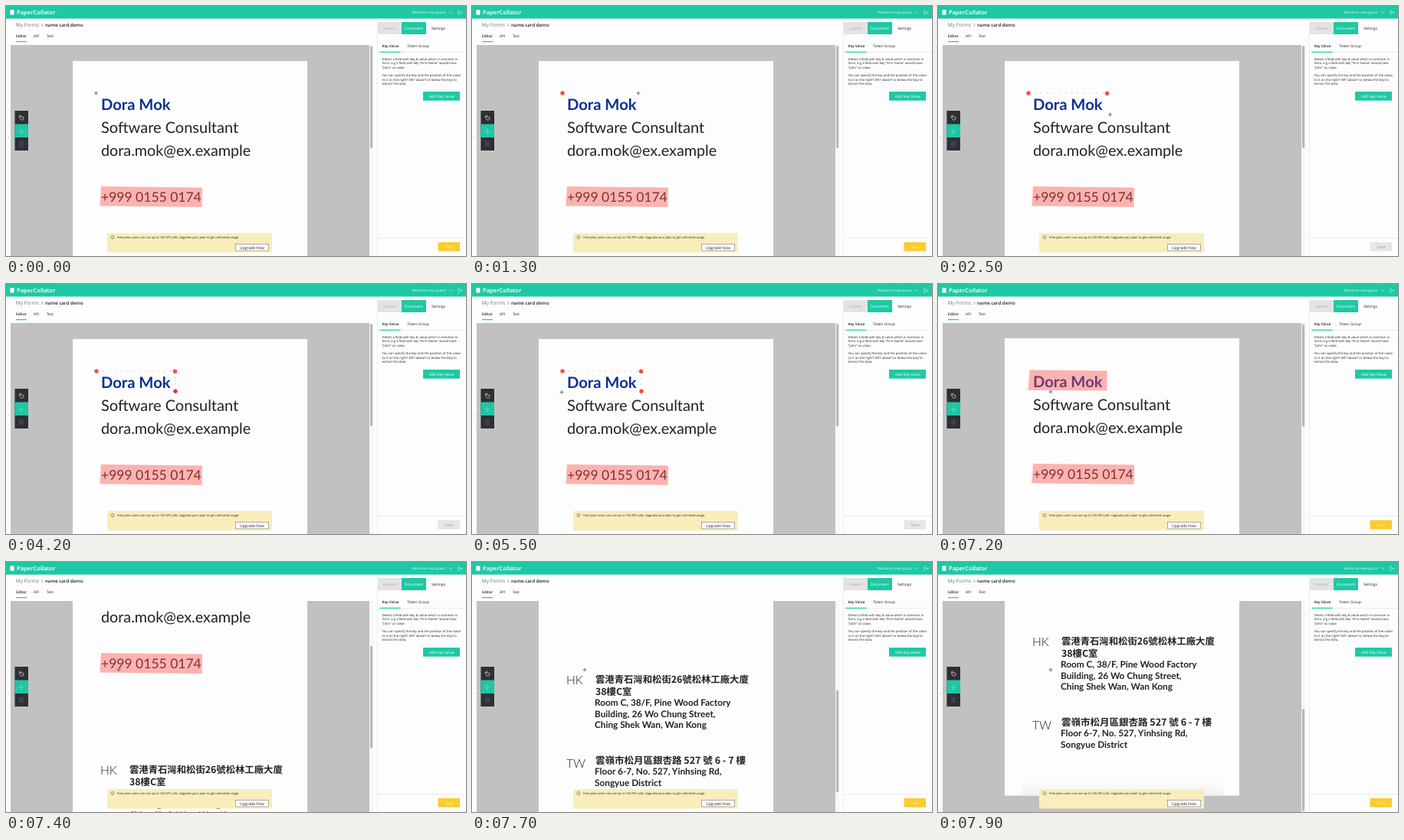
These frames come from a looping animation (600 by 327 pixels, 8 s). An HTML page:

```html
<!DOCTYPE html>
<html lang="en">
<head>
<meta charset="utf-8">
<style>
html, body { margin: 0; width: 100%; height: 100%; overflow: hidden; background: #fdfdfd; }
svg { display: block; font-family: "Open Sans", "Noto Sans", sans-serif; }
.card { font-family: Lato, sans-serif; fill: #222; }
.cjk { font-family: "Noto Sans CJK TC", "Noto Sans CJK", sans-serif; }
text { white-space: pre; text-rendering: geometricPrecision; }
</style>
</head>
<body>
<svg id="stage" width="600" height="327" viewBox="0 0 600 327">
  <clipPath id="view"><rect x="6" y="51" width="468" height="276"/></clipPath>
  <linearGradient id="shade" x2="0" y2="1">
    <stop stop-color="#fdfdfd"/><stop offset="1" stop-color="#f1f1f1"/>
  </linearGradient>

  <!-- document viewport -->
  <rect x="6" y="51" width="468" height="276" fill="#c1c1c1"/>
  <g clip-path="url(#view)">
    <g id="page">
      <rect x="87" y="72" width="306" height="518.500" fill="#fdfdfd"/>
      <rect x="110" y="572" width="262" height="18.500" fill="url(#shade)"/>
      <g id="cardText" class="card"></g>
      <g fill="#f94a47" fill-opacity=".42">
        <path d="M124 236L256 237.500L255.500 263L122.500 261.500Z"/>
        <path id="region" d="M119.500 113.500L220.500 114.500L220.500 140.500L117.500 140Z"/>
      </g>
    </g>
  </g>
  <g id="outline" fill="none" stroke="#f9a3a0" stroke-dasharray="1.500 6.500" stroke-dashoffset="-8">
    <path id="topEdge" d="M118 114H220"/>
    <path id="sideEdge" d="M220.500 114V140"/>
  </g>
  <g id="dots" fill="#f84b47">
    <circle cx="118" cy="114" r="2.700"/>
    <circle cx="220.500" cy="114.300" r="2.700"/>
    <circle cx="221" cy="140.300" r="2.700"/>
  </g>
  <path id="cursor" d="M-2.500 0H2.500M0 -2.500V2.500" stroke="#465360" stroke-width=".8"/>

  <!-- scrollbar and left rail -->
  <rect x="474" y="51" width="5.500" height="276" fill="#f8f8f8"/>
  <rect id="thumb" x="475" y="52" width="3.200" height="134" rx="1.600" fill="#b8b8b8"/>
  <path d="M3.500 170.500L2.300 172L3.500 173.500" fill="none" stroke="#aaa" stroke-width=".5"/>

  <!-- toolbar -->
  <rect x="11.500" y="137" width="17.500" height="52" fill="#2f2f33"/>
  <rect x="11.500" y="154.500" width="17.500" height="17.500" fill="#1fc6a3"/>
  <g fill="none" stroke="#ddd" stroke-width=".7">
    <path d="M17 144L19 148.500Q21 150.500 23 148V145.500L19.500 145V142.500M17 143L19 145"/>
    <path d="M20 160V167M16.500 163.500H23.500M18 165.500L20 167L22 165.500" stroke="#8fe0cd" stroke-width=".5"/>
    <path d="M17 178H23M17 180.500H23M17 183H23" stroke="#4f6cb5"/>
  </g>

  <!-- header -->
  <rect width="600" height="16.500" fill="#1fc8a4"/>
  <rect x="5.500" y="5" width="5" height="6.500" fill="#fff"/>
  <g fill="none" stroke="#d9f7ef" stroke-width=".6">
    <path d="M578 7.500L580 9.500L582 7.500"/>
    <path d="M592 6H590V11H592M591.500 8.500H595M593.700 7.200L595 8.500L593.700 9.800"/>
  </g>
  <path d="M46.300 22.800L48.100 24.900L46.300 27" fill="none" stroke="#777" stroke-width=".7"/>
  <rect x="13" y="46" width="14" height="1.200" fill="#1fc8a4"/>

  <!-- side panel -->
  <path d="M484.500 17V327M484.500 60.500H600M484.500 303.700H600" stroke="#e4e4e4" stroke-width=".7"/>
  <rect x="485" y="21" width="31" height="16" fill="#e3e3e3"/>
  <rect x="516" y="21" width="32" height="16" fill="#1fc8a4"/>
  <rect x="487.500" y="59.700" width="27" height="1.200" fill="#1fc8a4"/>
  <rect x="544" y="112" width="48" height="11.700" fill="#1fc8a4"/>
  <rect id="save" x="563.500" y="309" width="28.500" height="11.700"/>

  <!-- plan banner -->
  <rect x="132" y="297" width="215" height="25.500" fill="#faedbc"/>
  <circle cx="139" cy="302.500" r="2.200" fill="none" stroke="#555" stroke-width=".5"/>
  <path d="M139 302V304M139 301V301.500" stroke="#555" stroke-width=".5"/>
  <rect x="299.500" y="311.500" width="43" height="8.500" fill="#fff" stroke="#777" stroke-width=".6"/>
  <g id="ui" fill="#222"></g>
</svg>

<script>
const $ = id => document.getElementById(id);

function label(parent, x, y, size, text, attrs = {}) {
  const el = document.createElementNS("http://www.w3.org/2000/svg", "text");
  const all = { x, y, "font-size": size, ...attrs };
  for (const key in all) el.setAttribute(key, all[key]);
  el.textContent = text;
  return $(parent).appendChild(el);
}
const ui = (...args) => label("ui", ...args);
const card = (...args) => label("cardText", ...args);

const bold = { "font-weight": 700 }, semi = { "font-weight": 600 }, light = { "font-weight": 300 };
const white = { fill: "#fff" }, mid = { "text-anchor": "middle" };
const cjk = { ...bold, class: "cjk" };

ui(14, 11.2, 7.6, "PaperCollator", { ...white, ...semi });
ui(529, 10.3, 4.75, "Welcome new-guest", { fill: "#d9f7ef" });
ui(12.7, 27.3, 6.6, "My Forms", { fill: "#777" });
ui(51, 27.3, 6.1, "name card demo", semi);
ui(13, 41, 4.8, "Editor", semi);
ui(36, 41, 4.8, "API");
ui(53, 41, 4.8, "Test");
ui(500.5, 31, 4.9, "Labeler", { ...mid, fill: "#b0b0b0" });
ui(532, 31, 4.95, "Document", { ...mid, ...white });
ui(564, 31, 4.9, "Settings", mid);
ui(501.4, 53.8, 4.7, "Key Value", { ...mid, ...semi });
ui(537.5, 53.8, 4.8, "Token Group", mid);
[
  [70.7, "Detect a field with key & value which is common in"],
  [76.3, "form, e.g a field with key \"First Name\" would have"],
  [82, "\"John\" as value."],
  [92, "You can specify the key and the position of the value"],
  [97.7, "(is it on the right? left? above? or below the key) to"],
  [103.4, "extract the data."]
].forEach(([y, text]) => ui(490.6, y, 4.22, text));
ui(568.3, 119.8, 5, "Add Key Value", { ...mid, ...white });
const saveText = ui(578, 316.8, 5, "Save", mid);
ui(145, 304, 4, "Free plan users can use up to 100 API calls. Upgrade your plan to get unlimited usage.");
ui(321, 317.6, 5, "Upgrade Now", mid);

card(124, 136, 20.2, "Dora Mok", { ...bold, fill: "#0b2f95" });
card(124, 166, 20, "Software Consultant");
card(124, 195.5, 19.8, "dora.mok@ex.example");
card(124, 255.5, 17.5, "+999 0155 0174");
card(123, 395, 15.7, "HK", light);
card(161, 392.5, 12.35, "雲港青石灣和松街26號松林工廠大廈", cjk);
card(161, 408.5, 12.35, "38樓C室", cjk);
card(160, 423, 11.8, "Room C, 38/F, Pine Wood Factory", bold);
card(160, 437.5, 11.8, "Building, 26 Wo Chung Street,", bold);
card(160, 452, 11.8, "Ching Shek Wan, Wan Kong", bold);
card(123, 503.5, 15.7, "TW", light);
card(161, 498.5, 12.5, "雲嶺市松月區銀杏路 527 號 6 - 7 樓", cjk);
card(160, 513, 11.8, "Floor 6-7, No. 527, Yinhsing Rd,", bold);
card(160, 527.5, 11.8, "Songyue District", bold);

// Keys: [time, value...]
const cursorKeys = [
  [0, 117.5, 114], [500, 117.5, 114], [1400, 220.5, 114], [1600, 220.5, 114],
  [1900, 221, 134], [2400, 224.5, 142], [2500, 224.5, 142], [2900, 221, 140.3],
  [4200, 221, 140.3], [5300, 117, 141.5], [6900, 117, 141.5], [7200, 147, 141], [8000, 147, 141]
];
const scrollKeys = [
  [0, 0], [7100, 0], [7200, 1], [7300, 52], [7400, 117], [7500, 190],
  [7600, 190], [7700, 235], [7800, 268], [7900, 285], [8000, 285]
];

function at(keys, t) {
  const i = keys.findIndex(key => key[0] > t);
  const [a, b] = [keys[i - 1], keys[i]];
  const p = (t - a[0]) / (b[0] - a[0]), ease = p * p * (3 - 2 * p);
  return a.slice(1).map((v, k) => v + (b[k + 1] - v) * ease);
}
const show = (el, on) => el.style.visibility = on ? "visible" : "hidden";

function draw(now) {
  const t = Math.floor(now % 8000 / 100) * 100; // ten steps per second
  const drawing = t < 6600;
  const [scroll] = at(scrollKeys, t);
  $("cursor").setAttribute("transform", `translate(${at(cursorKeys, t)})`);
  $("page").setAttribute("transform", `translate(0 ${-scroll})`);
  $("thumb").setAttribute("y", 52 + scroll * 140 / 285);

  [300, 1500, 3100].forEach((start, i) => show($("dots").children[i], drawing && t >= start));
  show($("topEdge"), drawing && t >= 1700);
  show($("sideEdge"), drawing && t >= 3100);
  show($("region"), !drawing);

  const disabled = drawing && t >= 2100;
  $("save").setAttribute("fill", disabled ? "#e6e6e6" : "#fdcb2f");
  saveText.setAttribute("fill", disabled ? "#999" : "#fff0b8");
  requestAnimationFrame(draw);
}
requestAnimationFrame(draw);
</script>
</body>
</html>
```
